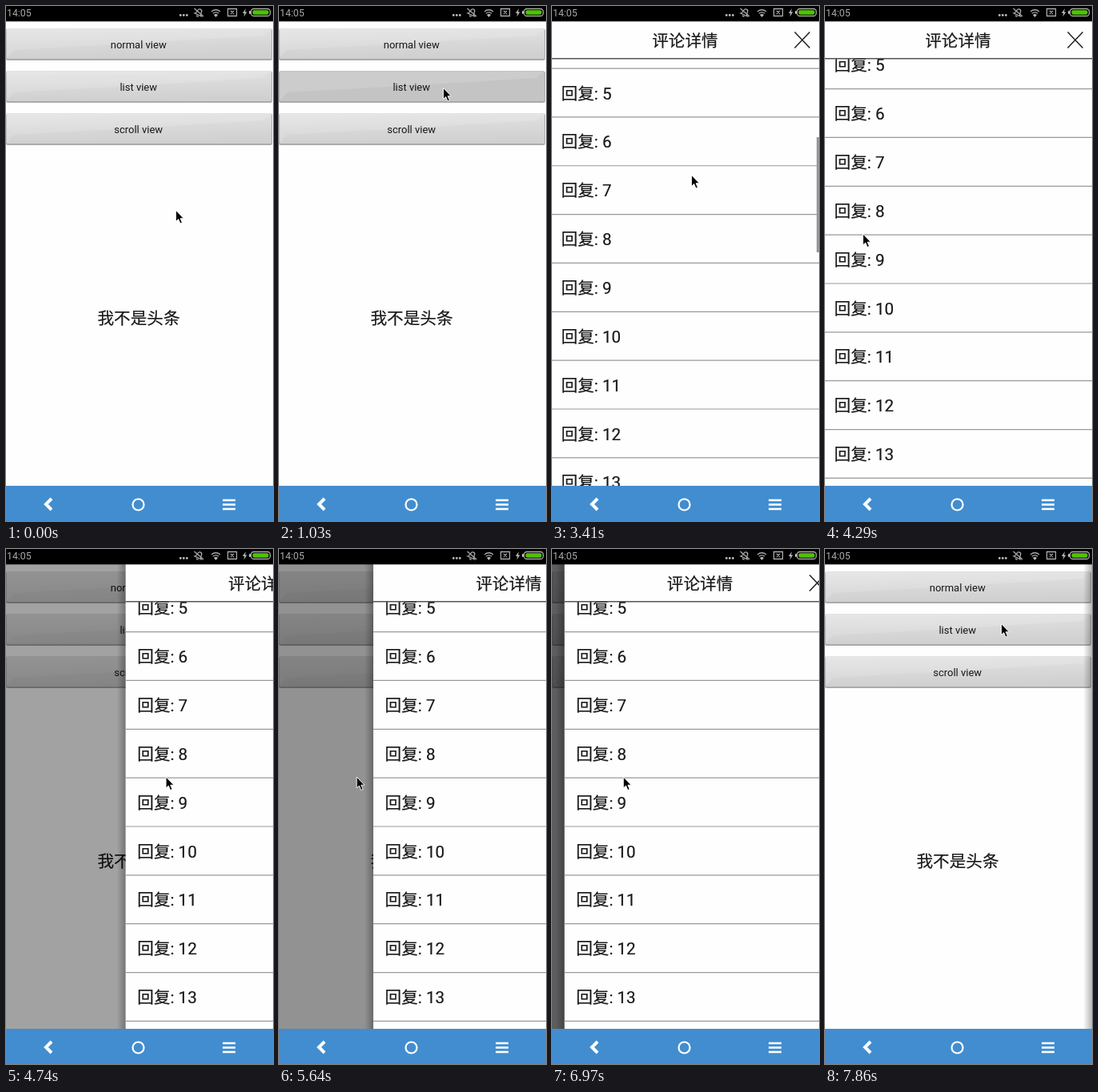
An HTML page for the animation above (8000 ms loop, 334x644 px).

```html
<!DOCTYPE html>
<html lang="zh-CN">
<head>
<meta charset="utf-8">
<title>Swipe to close</title>
<style>
  html, body { margin: 0; width: 100%; height: 100%; overflow: hidden; background: #fff; }
  svg { display: block; width: 100%; height: 100%; }
  text { font-family: Roboto, "Noto Sans CJK SC", "Noto Sans CJK", sans-serif; fill: #181818; }
  .cjk { font-size: 20.6px; stroke: #181818; stroke-width: .2; }
  .label { font-size: 13px; text-anchor: middle; }
  .mid { text-anchor: middle; }
  .icon { fill: none; stroke: #aaa; stroke-width: 1.3; }
  .nav { fill: none; stroke: #fff; }
</style>
</head>
<body>
<svg viewBox="0 0 334 644">
  <defs>
    <linearGradient id="face" x1="0" y1="0" x2=".12" y2="1">
      <stop offset="0" stop-color="#e3e3e3"/>
      <stop offset=".5" stop-color="#d9d9d9"/>
      <stop offset="1" stop-color="#d0d0d0"/>
    </linearGradient>
    <linearGradient id="edge">
      <stop offset="0" stop-opacity="0"/>
      <stop offset="1" stop-opacity=".28"/>
    </linearGradient>
    <clipPath id="screen"><rect y="19" width="334" height="581"/></clipPath>
    <clipPath id="viewport"><rect x="-3" y="66" width="340" height="534"/></clipPath>
  </defs>

  <rect width="334" height="644" fill="#fefefe"/>
  <g id="buttons"></g>
  <text class="cjk mid" x="166" y="397.5">我不是头条</text>

  <g clip-path="url(#screen)">
    <rect id="dim" y="19" width="334" height="581"/>
    <g id="panel">
      <rect id="shadow" x="-14" y="19" width="11" height="581" fill="url(#edge)"/>
      <rect x="-3" y="19" width="340" height="581" fill="#fefefe"/>
      <g clip-path="url(#viewport)">
        <g id="list"></g>
        <rect id="bar" x="331" y="67" width="3" height="144" fill="#999"/>
      </g>
      <path d="M-3 65.700H337" stroke="#555" stroke-width="1.400"/>
      <text class="cjk mid" x="166.400" y="50.500">评论详情</text>
      <path d="M303.500 32.500l19 20m0-20l-19 20" stroke="#222" stroke-width="1.500"/>
    </g>
  </g>

  <rect width="334" height="19.300"/>
  <text x="1" y="13" style="font-size:12.3px;fill:#aaa">14:05</text>
  <g fill="#bbb">
    <circle cx="218.300" cy="11.500" r="1.400"/>
    <circle cx="222.300" cy="11.500" r="1.400"/>
    <circle cx="226.300" cy="11.500" r="1.400"/>
    <path d="M300 3l-4 6h2.400l-1 4.500 4-6h-2.400z"/>
    <path d="M262.500 14l-2.500-3q2.500-2 5 0z"/>
    <rect x="304" y="6" width="2" height="4" rx="1"/>
  </g>
  <g class="icon">
    <path transform="rotate(25 241 8)" d="M237 11q2-1.500 2-4.500 0-3 2.500-3t2.500 3q0 3 2 4.500zM240 13h3"/>
    <path d="M235.500 3l11.500 10"/>
    <path d="M257 7q5.500-4.500 11 0M258.800 9.300q3.700-3 7.400 0"/>
    <path d="M277.500 3.500h11v9h-11zM281 6l4 4m0-4l-4 4"/>
    <rect x="306.500" y="3.500" width="24" height="9" rx="3.500"/>
  </g>
  <rect x="308.500" y="5.300" width="20" height="5.400" rx="2" fill="#4fc300"/>

  <rect y="600" width="334" height="44" fill="#428dcf"/>
  <path class="nav" d="M57 616l-7 7 7 7" stroke-width="4"/>
  <circle class="nav" cx="165.500" cy="623.500" r="7" stroke-width="2.200"/>
  <path class="nav" d="M271 618h16m-16 5.500h16m-16 5.500h16" stroke-width="2.600"/>

  <path id="cursor" d="M.5.5V14.500L3.700 11.500 6 17 8.400 16 6.100 10.700H10.300Z" stroke="#fff" stroke-width=".9"/>
</svg>

<script>
const $ = id => document.getElementById(id);
const LOOP = 8000, FIRST = 290, STEP = 148.43;
const ROW = 60.85, WIDTH = 334, HIDDEN = 337;

$('buttons').innerHTML = ['normal view', 'list view', 'scroll view'].map((name, i) => `
  <g transform="translate(0 ${28 + i * 53})">
    <rect y=".5" width="333" height="39.5" rx="2" fill="#aaa"/>
    <rect class="face" x=".5" width="331.5" height="38" rx="1.5" fill="url(#face)"/>
    <path d="M1 1H331L322 9Q165 19 10 27L1 37Z" fill="#fff" opacity=".13"/>
    <text class="label" x="165.7" y="24.5">${name}</text>
  </g>`).join('');
const pressable = document.querySelectorAll('.face')[1];

const line = (text, x, y) => `<text class="cjk" x="${x}" y="${y}">${text}</text>`;
const comment = ['评论详情,', '评论详情,', '评论详情'].map((text, i) => line(text, 11 + i * 99, 104.2));
const replies = Array.from({ length: 19 }, (_, i) => line(`回复: ${i}`, 11.6, 104.2 + (i + 1) * ROW));
const rules = replies.map((_, i) =>
  `<path d="M-3 ${126.5 + i * ROW}H337" stroke="#999" stroke-width="1.2"/>`);
$('list').innerHTML = [...comment, ...replies, ...rules].join('');

// Progress from 0 to 1 between two ticks.
const linear = (tick, from, to) => Math.min(1, Math.max(0, (tick - from) / (to - from)));
const smooth = (tick, from, to) => {
  const p = linear(tick, from, to);
  return p * p * (3 - 2 * p);
};

const gestures = [
  { from: -1, to: 5, x: 205, y: 102 },     // reach the button
  { from: 8, to: 12, x: 187, y: 401 },     // go to the list
  { from: 14, to: 21, x: 174, y: 211 },    // scroll
  { from: 21, to: 25, x: 47, y: 284.5 },   // go to the left edge
  { from: 26, to: 32, x: 253, y: 284.5 },  // swipe out
  { from: 32, to: 37.6, x: 58, y: 284.5 }, // and back
  { from: 44, to: 48, x: 255, y: 284.5 },  // swipe away
  { from: 48, to: 51, x: 220, y: 93 },     // return to the button
];

const cursorAt = tick => gestures.reduce(([x, y], g) => {
  const p = smooth(tick, g.from, g.to);
  return [x + (g.x - x) * p, y + (g.y - y) * p];
}, [212, 255]);

function slideAt(tick) {
  const opening = HIDDEN * (1 - linear(tick, 6, 10)) ** 3;
  const peek = 242 * (smooth(tick, 26, 32.8) - smooth(tick, 33, 39));
  return opening + peek + HIDDEN * smooth(tick, 44, 51);
}

const move = (id, x, y) => $(id).setAttribute('transform', `translate(${x} ${y})`);
const fade = (id, opacity) => $(id).setAttribute('opacity', opacity);

function draw(time) {
  const tick = Math.max(-1, Math.floor((time % LOOP - FIRST + 5) / STEP));
  const slide = slideAt(tick);
  const scroll = 388 * smooth(tick, 14, 22.6);
  const swiping = tick > 25 && slide > 0;

  move('cursor', ...cursorAt(tick));
  move('panel', slide, 0);
  move('list', 0, -scroll);
  move('bar', 0, scroll * .275);
  fade('bar', 1 - linear(tick, 23, 26));
  fade('shadow', swiping ? 1 : 0);
  fade('dim', swiping ? .67 * Math.max(0, 1 - slide / WIDTH) : 0);
  pressable.setAttribute('fill', tick >= 5 && tick < 8 ? '#c4c4c4' : 'url(#face)');
}

const start = performance.now();
function loop() {
  draw(performance.now() - start);
  requestAnimationFrame(loop);
}
loop();
</script>
</body>
</html>
```
